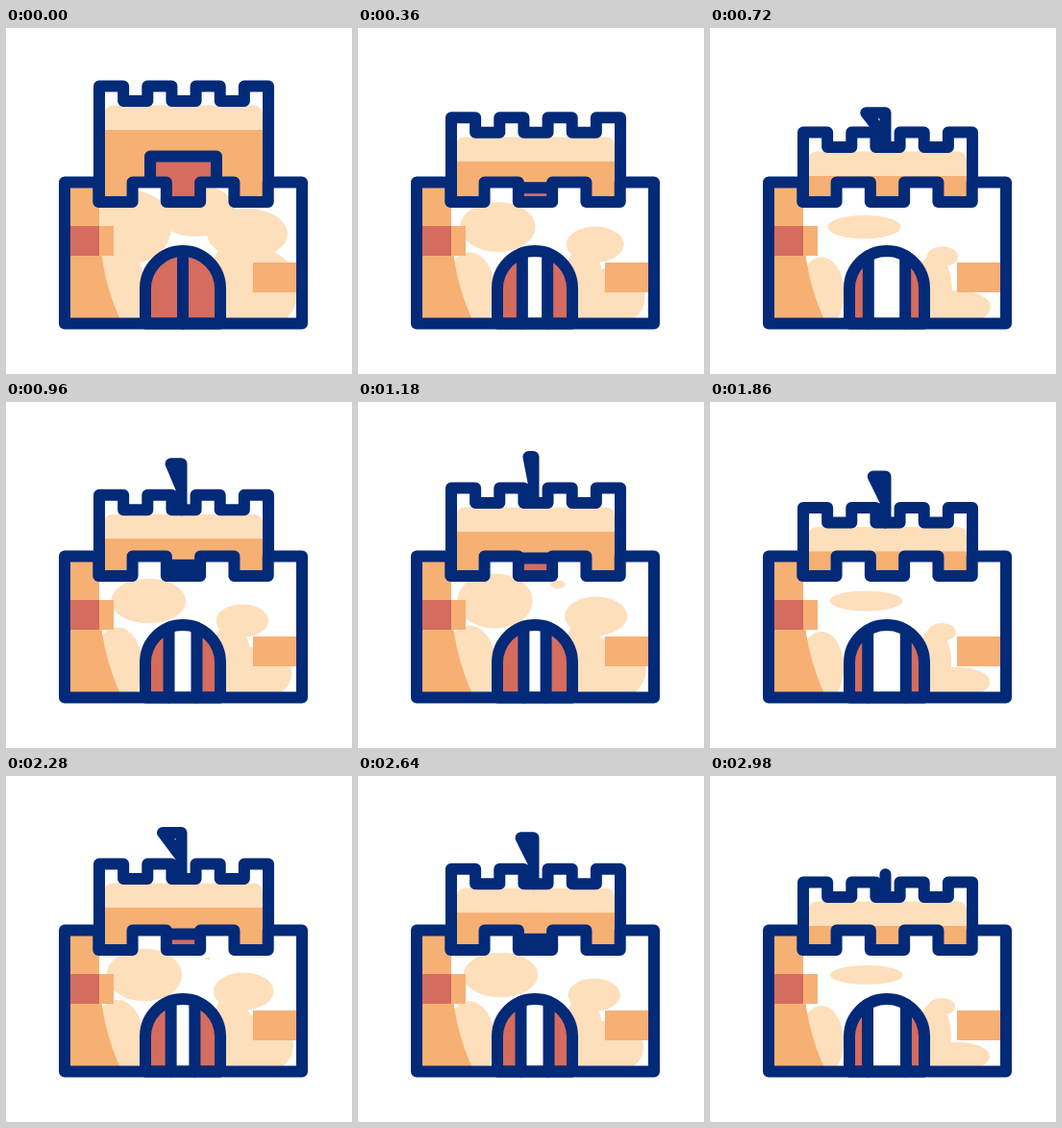
Recreate the animation shown at these times as an HTML page with a canvas. Size 360 by 360 pixels, loop 3000 ms.

```html
<!DOCTYPE html>
<html lang="en">
<head>
<meta charset="utf-8">
<title>Castle</title>
<style>
html, body { margin: 0; width: 100%; height: 100%; overflow: hidden; background: #fff; }
canvas { display: block; width: 360px; height: 360px; }
</style>
</head>
<body>
<canvas id="stage" width="360" height="360"></canvas>
<script>
const ctx = document.getElementById('stage').getContext('2d');
const NAVY = '#032a78', RED = '#d56c5e', ORANGE = '#f6b074', PEACH = '#fddfbc';
const LOOP = 3000, BEAT = 600, DROP = 50;

// Light patches on the wall as ellipses [x, y, rx, ry]: door closed, door open.
const PATCHES = [
  [[116, 275, 30, 46], [116, 276, 23, 37]],
  [[132, 207, 40, 38], [163, 207, 38, 10]],
  [[197, 190, 42, 27], [230, 190, -60, -40]],
  [[251, 214, 42, 26], [241, 240, 14, 9]],
  [[236, 270, 24, 50], [233, 272, 18, 36]],
  [[264, 272, 40, 42], [258, 292, 33, 15]]
];

const mix = (a, b, u) => a + (b - a) * u;

function ease(from, to, t) {
  const u = Math.max(0, Math.min(1, (t - from) / (to - from)));
  return u * u * (3 - 2 * u);
}

// Points of a crenellated edge: seven equal spans, every second one low.
function battlement(x0, x1, high, low) {
  const pts = [], step = (x1 - x0) / 7;
  for (let i = 0; i < 7; i++) {
    const y = i % 2 ? low : high;
    pts.push(x0 + i * step, y, x0 + (i + 1) * step, y);
  }
  return pts;
}

function trace(...pts) {
  const path = new Path2D();
  for (let i = 0; i < pts.length; i += 2) path.lineTo(pts[i], pts[i + 1]);
  return path;
}

const line = (...pts) => ctx.stroke(trace(...pts));

function fill(path, color) {
  ctx.fillStyle = color;
  ctx.fill(path);
}

function rect(x, y, w, h, color) {
  ctx.fillStyle = color;
  ctx.fillRect(x, y, w, h);
}

function inside(path, paint) {
  ctx.save();
  ctx.clip(path);
  paint();
  ctx.restore();
}

const wall = trace(...battlement(61, 308, 160.5, 181), 308, 307.5, 61, 307.5);
wall.closePath();
const shade = new Path2D('M61 160H97V200Q97 258 121 308H61Z');
const arch = new Path2D('M145 307.5V271A39 39 0 0 1 223 271V307.5Z');

function drawFlag(base, t) {
  const len = 48 * (ease(480, 840, t) - ease(2800, 3160, t));
  if (!len) return;
  const wave = 22 - 17 * ease(600, 1200, t) + 15 * ease(1300, 2400, t) - 20 * ease(2400, 3000, t);
  const x = 182.5, tip = base - len, w = wave * Math.min(1, len / 30);
  line(x, base, x, tip, x - w, tip, x, Math.min(tip + 26, base));
}

function drawTower(sink, t) {
  const y = 60.5 + sink;
  const top = new Path2D();
  top.roundRect(102, y + 20, 165, 40, 9);
  fill(top, PEACH);
  rect(100, y + 45.5, 170, 75, ORANGE);
  rect(150, y + 73, 69, 47, RED);
  line(150, y + 124, 150, y + 73, 219, y + 73, 219, y + 124);
  line(97, 181, ...battlement(97, 273, y, y + 15.5), 273, 181);
  drawFlag(y + 15.5, t);
}

function drawWall(open) {
  fill(wall, '#fff');
  inside(wall, () => {
    for (const [shut, wide] of PATCHES) {
      const [x, y, rx, ry] = shut.map((v, i) => mix(v, wide[i], open * open));
      const patch = new Path2D();
      patch.ellipse(x, y, Math.max(0, rx), Math.max(0, ry), 0, 0, 2 * Math.PI);
      fill(patch, PEACH);
    }
    fill(shade, ORANGE);
    rect(61, 206, 36, 31, RED);
    rect(97, 206, 15, 31, ORANGE);
    rect(257, 244, 45, 31, ORANGE);
  });
}

function drawDoor(gap) {
  fill(arch, RED);
  inside(arch, () => rect(184 - gap, 230, 2 * gap, 78, '#fff'));
  const y = 271 - Math.sqrt(39 * 39 - gap * gap);
  for (const x of [184 - gap, 184 + gap]) line(x, y, x, 307.5);
  ctx.stroke(arch);
}

function draw(t) {
  rect(0, 0, 360, 360, '#fff');
  ctx.strokeStyle = NAVY;
  ctx.lineWidth = 12;
  ctx.lineCap = ctx.lineJoin = 'round';
  // The tower drops fully once, then bobs with a smaller swing.
  const swing = (1 + Math.cos(Math.PI * t / BEAT)) / 2;
  const sink = DROP - (t < BEAT ? DROP : 21) * swing;
  const open = sink / DROP;
  drawTower(sink, t);
  drawWall(open);
  drawDoor(20 * open);
  ctx.stroke(wall);
}

const start = performance.now();
function tick() {
  draw((performance.now() - start) % LOOP);
  requestAnimationFrame(tick);
}
tick();
</script>
</body>
</html>
```
